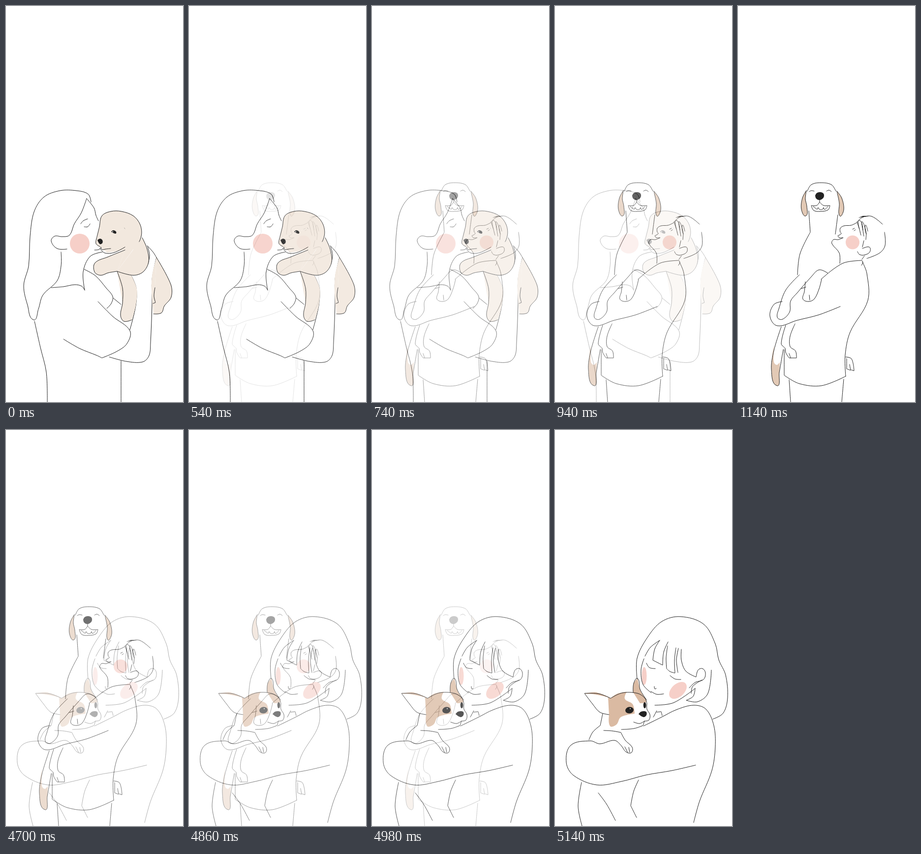
An HTML page that plays this animation: 360x800 px, repeating every 8 s.

```html
<!DOCTYPE html>
<html lang="en">
<head>
<meta charset="utf-8">
<title>Hugs</title>
<style>
html, body { margin: 0; width: 100%; height: 100%; overflow: hidden; background: #fff; }
svg { display: block; width: 100%; height: 100%; }
.line { fill: none; stroke: #222; stroke-width: 1; stroke-linecap: round; stroke-linejoin: round; }
.ink { fill: #222; }
.blush { fill: #f6cfc8; }
.cream { fill: #f2e8de; }
.tan { fill: #e2c9b5; }
.brown { fill: #dabaa2; }
.white { fill: #fff; }
</style>
</head>
<body>
<svg id="stage" viewBox="0 0 360 800"></svg>
<script>
const LOOP = 8000, STEP = 40, STEPS = 17;
let out = "";

// Handles follow the chord of the neighbours, scaled to each segment.
function handle(p, dir, len) {
  const size = Math.hypot(...dir) || 1;
  return p.map((v, i) => (v + dir[i] / size * len).toFixed(1));
}

function smooth(pts) {
  const dir = pts.map((p, i) => {
    const a = pts[i - 1], b = pts[i + 1];
    return a && b ? [b[0] - a[0], b[1] - a[1]] : [0, 0];
  });
  return pts.slice(1).map((q, i) => {
    const p = pts[i], len = Math.hypot(q[0] - p[0], q[1] - p[1]) / 3;
    return `C${handle(p, dir[i], len)} ${handle(q, dir[i + 1], -len)} ${q}`;
  }).join("");
}

// A slash marks a corner: the curve starts anew from the last point.
function curve(text) {
  let last = null, d = "";
  for (const part of text.split("/")) {
    const n = part.trim().split(/\s+/).map(Number), pts = last ? [last] : [];
    for (let i = 0; i < n.length; i += 2) pts.push([n[i], n[i + 1]]);
    if (!last) d = "M" + pts[0];
    d += smooth(pts);
    last = pts[pts.length - 1];
  }
  return d;
}

const path = (cls, d) => { out += `<path class="${cls}" d="${d}"/>`; };
const line = text => path("line", curve(text));
const fill = (cls, text) => path(cls, curve(text) + "Z");
const both = (cls, text) => { fill(cls, text); line(text); };
const oval = (cls, x, y, rx, ry = rx, turn = 0) => {
  out += `<ellipse class="${cls}" cx="${x}" cy="${y}" rx="${rx}" ry="${ry}" transform="rotate(${turn} ${x} ${y})"/>`;
};

function puppy() {
  fill("cream", "264 602 266 572 255 545 / 226 536");
  fill("cream", "226 536 255 545 / 266 572 264 605 256 634 / 237 600");
  fill("cream", "242 493 276 468 / 226 536");
  both("cream", "226 536 237 570 237 600 233 625 240 637 256 634");
  both("cream", "300 622 316 620 322 606 336 588 335 562 306 508");
  fill("cream", "306 508 297 545 296 580 300 622");
  both("cream", "277 468 287 491 290 517 279 537 259 544 226 536");
  both("cream", "184 470 190 446 195 424 213 415 235 415 259 424 273 442 275 465 264 482 254 471 241 449");
  fill("cream", "184 470 183 480 191 487 / 206 498 / 242 493 / 285 490 / 241 449");
  both("cream", "242 493 207 507 181 519 180 537 192 544 208 539 226 536");
  line("184 470 183 480 191 486");
  line("193 487 195 492 203 491 213 490");
  line("191 490 201 499 220 498 242 487");
  line("303 569 301 586 304 599 / 299 601");
  fill("ink", "186 473 191 470 196 473 196 479 191 481 186 473");
  fill("ink", "214 456 218 453 224 456 223 460 214 456");
  oval("white", 217, 456, 1);
}

function woman() {
  oval("blush", 150, 480, 20);
  line("173 396 167 380 143 373 110 373 77 386 57 416 49 465 46 525 36 565 44 605 56 634 66 612 75 584 104 555 112 525 112 497");
  line("124 491 104 490 92 475 99 465 114 466 129 463 139 440 153 418 164 389");
  line("164 389 179 408 183 423 188 434");
  line("152 440 157 434 166 430");
  line("159 446 166 446 171 440");
  line("180 493 189 492 193 488");
  line("196 497 171 506 157 537 160 574");
  line("92 569 117 567 140 563 154 566 160 574");
  line("159 532 182 545 204 570 217 587 214 601 205 611");
  line("218 590 234 603");
  line("187 597 217 627 252 656 246 682 225 698 195 711 / 185 706 150 692 117 673");
  line("210 709 245 718 278 719 291 706 294 680 297 600 297 552 306 508 / 299 497 287 484");
  line("288 486 292 503 289 521");
  line("255 545 265 570 264 605 252 654");
  line("58 637 70 690 82 740 84 800");
  line("234 717 234 800");
}

function dog() {
  both("tan", "139 373 131 388 129 411 138 424 140 405 137 390 139 373");
  both("tan", "201 374 211 388 215 412 207 424 206 398 201 374");
  fill("tan", "73 684 68 735 79 767 84 740 85 719 / 79 725 73 719 73 684");
  line("88 648 73 696 68 735 79 767 84 740 92 694");
  fill("ink", "157 383 160 378 167 376 174 379 174 387 166 392 159 389 157 383");
  line("141 374 149 361 168 357 190 361 199 374");
  line("145 375 149 373 155 374");
  line("180 374 185 372 190 375");
  line("166 392 166 396 / 160 403 149 403 / 154 413 167 415 183 412 187 403 / 174 403 166 396");
  line("153 405 161 411 / 163 407 / 166 411 172 411 / 174 407 / 176 411 183 405");
  line("144 414 147 457 / 126 501 121 543");
  line("203 422 198 461");
  line("125 543 97 574 83 612 80 629 90 633 105 618 107 596 120 580 149 547 165 533 183 540 / 169 552");
  line("128 571 138 568");
  line("137 557 135 577 132 592 143 597 155 592 165 571 170 552");
  line("145 584 146 594");
  line("97 645 88 682 96 692 97 700 104 711 / 119 711 / 117 697 106 688 106 667 116 642");
  line("104 702 107 711");
}

function man() {
  oval("blush", 233, 477.5, 14);
  fill("ink", "245 428 255 424 267 425 / 255 426 245 428");
  line("241 438 230 443 216 444 208 449 208 457 / 210 460 203 464 / 206 468 214 468 / 204 472 194 472 191 480 206 499 207 520");
  line("233 451 237 449");
  line("236 454 239 452");
  line("242 437 253 427 272 425 294 441");
  line("298 457 299 484 288 499 262 510");
  line("242 436 247 451 / 247 433 254 453 / 253 436 261 461 / 259 443 264 455");
  line("247 451 250 463");
  line("254 453 256 465");
  line("261 461 260 472");
  line("256 474 253 487");
  line("243 496 247 502 257 503 268 497 267 487 253 490");
  line("257 505 252 512");
  line("183 540 215 519 252 514 / 254 518 251 524");
  line("253 517 262 540 264 595 228 659 218 705 219 748");
  line("94 694 94 746 / 125 763 170 767 219 748");
  line("208 607 164 624 120 635 80 646 65 627 73 603 90 597");
  line("219 709 231 713 236 737 / 230 735");
  line("221 712 221 733 / 229 736 / 227 724");
  line("104 755 107 800");
  line("215 754 211 800");
}

function corgi() {
  fill("brown", "59 533 83 530 112 541 / 80 534 59 533");
  fill("brown", "113 542 126 533 146 529 / 142 543 158 554 162 573 / 134 580 125 595 112 598 110 575 / 108 540");
  fill("brown", "159 530 160 512 168 502 / 174 527 186 545 / 185 550 173 552 / 159 530");
  oval("ink", 151.5, 566, 8.5, 6.5, -10);
  oval("white", 153, 563, 1);
  oval("ink", 182.5, 556, 2.8, 6.2);
  fill("ink", "170 574 175 569 185 569 186 576 180 580 170 574");
  line("110 575 91 570 76 553 60 532 / 90 533 113 542 / 137 531 168 532 183 542 187 553 / 187 564 193 575 191 586 182 588 / 172 593 160 590");
  line("182 588 179 597 / 161 603 135 605");
  line("159 530 160 512 168 502 173 524 186 545");
  line("97 573 92 597 / 77 610 69 626");
}

function face() {
  oval("blush", 181.5, 497, 5, 18);
  oval("blush", 250, 526, 21, 13, -42);
  line("167 503 167 461 188 419 217 387 255 377 302 392 326 432 333 464 347 495 351 541 342 572 321 584");
  line("213 425 194 439 183 457");
  line("181 462 175 484 179 514 196 531");
  line("213 425 203 442 199 465 / 219 475 / 221 449 230 428");
  line("229 436 226 460 227 482 / 234 488 244 491 / 243 465 246 440");
  line("251 441 247 464 250 490");
  line("257 443 257 465 266 487 287 499 / 291 485 300 482 306 491 302 504 285 510 273 521");
  line("299 505 280 518 277 532");
  line("285 522 281 538 267 546 / 290 549 311 532 318 485");
  line("186 471 192 480 204 482");
  line("234 496 244 503 256 504");
  line("202 518 203 523 206 522");
  line("195 528 207 534 221 533");
  line("203 556 241 551 285 522");
}

function girl() {
  line("200 580 207 567");
  line("207 570 216 569 / 218 577");
  line("180 598 215 581 247 565 282 556 307 564 323 597 326 640 319 688 294 750 282 793");
  line("286 677 238 688 185 697 135 710 85 717 38 698 23 672 32 637 72 628 91 634 121 627 135 638 144 650 155 652 157 641 143 627 134 611 / 117 608 99 607");
  line("142 640 148 652");
  line("150 641 152 651");
  line("54 712 47 760 55 800");
  line("88 733 105 756 123 789");
  line("170 707 160 730 154 759 / 166 783");
}

const scenes = [[woman, puppy], [dog, man], [corgi, face, girl]];
scenes.forEach((parts, i) => {
  out += `<g id="s${i}"><rect class="white" width="360" height="800"/>`;
  parts.forEach(paint => paint());
  out += "</g>";
});
document.getElementById("stage").innerHTML = out;

const fades = [
  { el: document.getElementById("s1"), start: 500 },
  { el: document.getElementById("s2"), start: 4500 }
];

function draw(t) {
  for (const { el, start } of fades) {
    const n = Math.floor((t - start) / STEP) + 1;
    el.setAttribute("opacity", Math.min(STEPS, Math.max(0, n)) / STEPS);
  }
}

const begin = performance.now();
function tick(now) {
  draw(Math.max(0, now - begin) % LOOP);
  requestAnimationFrame(tick);
}
draw(0);
requestAnimationFrame(tick);
</script>
</body>
</html>
```
